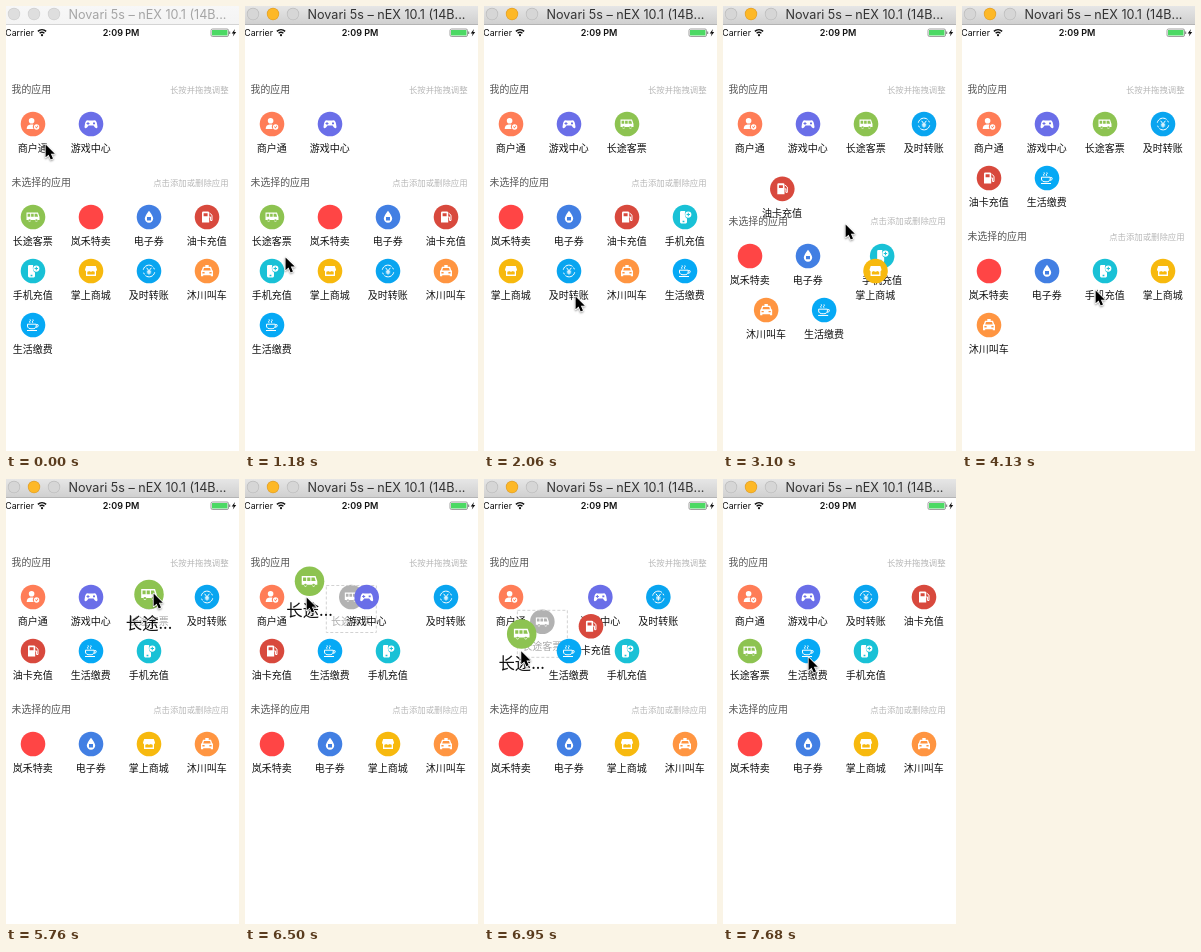
An HTML page with a canvas for the animation above (8 s loop, 233 px wide and 445 px high).

```html
<!DOCTYPE html>
<html lang="zh-CN">
<head>
<meta charset="utf-8">
<style>
html, body { margin: 0; width: 100%; height: 100%; overflow: hidden; background: #fff }
canvas { display: block; width: 233px; height: 445px }
</style>
</head>
<body>
<canvas id="stage"></canvas>
<script>
const canvas = document.getElementById('stage'), ctx = canvas.getContext('2d');
const W = 233, H = 445, LOOP = 8000, STEP = 147.7, SHIFT = 300;
const dpr = window.devicePixelRatio || 1;
canvas.width = W * dpr;
canvas.height = H * dpr;

const CJK = '"Noto Sans CJK SC", "Noto Sans CJK", sans-serif';
const LATIN = 'Inter, Roboto, sans-serif';

// label, colour, filled glyph, stroked glyph
const apps = {
  shop: ['商户通', '#ff7d57',
    'M-4.2-3.2a2.8 2.8 0 1 1 5.6 0a2.8 2.8 0 1 1-5.6 0M-6.3 5Q-6.3 .8-2.5 .4L.4 .4Q-1 3 .6 5ZM.9 3a2.7 2.7 0 1 1 5.4 0a2.7 2.7 0 1 1-5.4 0M2 2.7L3.5 4.5L5.3 2L4.6 1.6L3.5 3.2L2.6 2.2Z', ''],
  game: ['游戏中心', '#6a6ee8',
    'M-4-3.8Q0-3 4-3.8Q6-3 6.5 3Q6 5.2 4 3.4L2.5 1.6H-2.5L-4 3.4Q-6 5.2-6.5 3Q-6-3-4-3.8ZM-3.5-2V-1H-4.5V0H-3.5V1H-2.5V0H-1.5V-1H-2.5V-2ZM2-1.5V.3H4V-1.5Z', ''],
  bus: ['长途客票', '#8dc351',
    'M-6.5-4.4H5L6.5 0V3H4.8A1.5 1.5 0 0 1 2 3H-2A1.5 1.5 0 0 1-4.8 3H-6.5ZM-5.4-3.2V-.2H-2.8V-3.2ZM-1.9-3.2V-.2H.7V-3.2ZM1.6-3.2V-.2H5.1L4.2-3.2ZM-4.6 3.4a1.2 1.2 0 1 0 2.4 0a1.2 1.2 0 1 0-2.4 0M2.2 3.4a1.2 1.2 0 1 0 2.4 0a1.2 1.2 0 1 0-2.4 0', ''],
  sale: ['岚禾特卖', '#ff4545', '', ''],
  ticket: ['电子券', '#427fe3',
    'M0-6.3Q4.2-1 4.2 1.5A4.2 4.2 0 1 1-4.2 1.5Q-4.2-1 0-6.3ZM-2 0V3.4H2V0Z', ''],
  fuel: ['油卡充值', '#d8493d',
    'M-5 5.5V-4.2Q-5-5.5-3.7-5.5H.8Q2.2-5.5 2.2-4.2V5.5ZM-3.4-3.7V-.8H.6V-3.7Z',
    'M2.5-4L5-1.8V3.5H3.6V0H2.2'],
  phone: ['手机充值', '#19c1d6',
    'M-5-4.6Q-5-6-3.8-6H.2Q-1 0 2 1.5V5.1Q2 6.4 .8 6.4H-3.8Q-5 6.4-5 5.1ZM-2.4 3.8V5.2H-.6V3.8ZM.2-2.4a3.1 3.1 0 1 1 6.2 0a3.1 3.1 0 1 1-6.2 0M2.8-4.2V-2.9H1.6V-2H2.8V-.7H3.8V-2H5V-2.9H3.8V-4.2Z', ''],
  mall: ['掌上商城', '#f7b90e',
    'M-4.8-5H4.8L6-1.5Q5.8 .3 5 .3V5H-5V.3Q-5.8 .3-6-1.5ZM-3.7 .8V3.6H3.7V.8Q2.6 .6 1.9 0Q0 1.6-1.9 0Q-2.6 .6-3.7 .8Z', ''],
  pay: ['及时转账', '#09a5f0', '',
    'M-5.7-1.3A5.8 5.8 0 0 1 3.6-4.6M5.7 1.3A5.8 5.8 0 0 1-3.6 4.6M-5.4 1.7L-4.6 3.4M5.4-1.7L4.6-3.4M-2.4-3.2L0-.2L2.4-3.2M0-.2V3.6M-2.2 .2H2.2M-2.2 1.9H2.2'],
  taxi: ['沐川叫车', '#ff9541',
    'M-1.7-6H1.7V-4.3H4L5.2-.8L6-.2V5.3H3.8V4.2H-3.8V5.3H-6V-.2L-5.2-.8L-4-4.3H-1.7ZM-3-3L-3.8-.6H3.8L3-3ZM-4.6 1V2.4H-2.4V1ZM2.4 1V2.4H4.6V1Z', ''],
  cup: ['生活缴费', '#06a9f5', '',
    'M-5.5-.8H3.2V1Q3.2 3.8-1 3.8Q-5.5 3.8-5.5 1ZM3.2-.3H5Q6 2.2 2.8 2.2M-6 5.5H4M-3-2.2Q-4-3.2-3-4T-3-5.6M-.2-2.2Q-1.2-3.2-.2-4T-.2-5.6']
};
for (const app of Object.values(apps)) {
  app[2] = new Path2D(app[2]);
  app[3] = new Path2D(app[3]);
}

// start time, chosen apps, remaining apps
const states = [
  [-999, 'shop game', 'bus sale ticket fuel phone mall pay taxi cup'],
  [1420, 'shop game bus', 'sale ticket fuel phone mall pay taxi cup'],
  [2250, 'shop game bus pay', 'sale ticket fuel phone mall taxi cup'],
  [2906, 'shop game bus pay fuel', 'sale ticket phone mall taxi cup'],
  [3620, 'shop game bus pay fuel cup', 'sale ticket phone mall taxi'],
  [4465, 'shop game bus pay fuel cup phone', 'sale ticket mall taxi'],
  [6322, 'shop bus game pay fuel cup phone', 'sale ticket mall taxi'],
  [6800, 'shop game pay fuel bus cup phone', 'sale ticket mall taxi']
].map(([start, mine, rest]) => {
  const at = {};
  mine = mine.split(' ');
  const head = 176 + 54 * (Math.ceil(mine.length / 4) - 1);
  const place = top => (id, i) => { at[id] = [27 + 58 * (i % 4), top + 54 * Math.floor(i / 4)]; };
  mine.forEach(place(118));
  rest.split(' ').forEach(place(head + 35));
  return { start, at, head };
});

const track = [
  [0, 39, 137], [600, 58, 296], [750, 58, 311], [1180, 40, 250], [1400, 31, 227],
  [1550, 33, 229], [1850, 74, 274], [2068, 91, 289], [2300, 92, 286], [2750, 134, 226],
  [2906, 134, 222], [3102, 122, 217], [3500, 88, 316], [3650, 87, 320], [4135, 133, 283],
  [4480, 138, 278], [4720, 143, 255], [4870, 149, 170], [5020, 151, 88], [5320, 147, 113],
  [6060, 147, 113], [6210, 138, 113], [6499, 61, 117], [6800, 48, 158], [7000, 32, 176],
  [7240, 27, 186], [7390, 28, 190], [7535, 70, 184], [7680, 85, 177], [LOOP, 85, 177]
];
const LIFT = 5755, DASH = 5900, DRAG = 6190, DROP = 7450, FOCUS = 580;

const mix = (a, b, p) => a + (b - a) * p;

function cursorAt(t) {
  const i = Math.max(1, track.findIndex(k => k[0] >= t));
  const [a, b] = [track[i - 1], track[i]];
  const p = (t - a[0]) / (b[0] - a[0]);
  return [mix(a[1], b[1], p), mix(a[2], b[2], p)];
}

function text(str, x, y, size, color, align = 'left', family = CJK, weight = 400) {
  ctx.font = `${weight} ${size}px ${family}`;
  ctx.fillStyle = color;
  ctx.textAlign = align;
  ctx.fillText(str, x, y);
}

function disc(x, y, r, color) {
  ctx.beginPath();
  ctx.arc(x, y, r, 0, 7);
  ctx.fillStyle = color;
  ctx.fill();
}

function icon(id, x, y, scale, color) {
  const [, main, fill, line] = apps[id];
  ctx.save();
  ctx.translate(x, y);
  ctx.scale(scale, scale);
  disc(0, 0, 12.3, color || main);
  ctx.fillStyle = ctx.strokeStyle = '#fff';
  ctx.fill(fill, 'evenodd');
  ctx.stroke(line);
  ctx.restore();
}

function tile(id, x, y, ghost) {
  icon(id, x, y, 1, ghost && '#b2b2b2');
  text(apps[id][0], x - .2, y + 27.8, 10, ghost ? '#aaa' : '#111', 'center');
}

function titleBar(active) {
  const g = ctx.createLinearGradient(0, 0, 0, 18);
  g.addColorStop(0, active ? '#e6e6e6' : '#f7f7f7');
  g.addColorStop(1, active ? '#d0d0d0' : '#f4f4f4');
  ctx.fillStyle = g;
  ctx.fillRect(0, 0, W, 18);
  ctx.fillStyle = active ? '#b4b4b4' : '#d4d4d4';
  ctx.fillRect(0, 18, W, 1);
  [8, 28, 48].forEach((x, i) => {
    const lit = active && i === 1;
    disc(x, 8, 6.2, lit ? '#e0a02c' : active ? '#bcbcbc' : '#cfcfcf');
    disc(x, 8, 5.5, lit ? '#fdb827' : active ? '#d6d6d6' : '#dedede');
  });
  text('Novari 5s – nEX 10.1 (14B...', 62.5, 13, 12.6, active ? '#333' : '#a5a5a5', 'left', LATIN);
}

function statusBar() {
  text('Carrier', 28, 30, 8.8, '#111', 'right', LATIN);
  text('2:09 PM', 115, 30, 9, '#111', 'center', LATIN, 600);
  ctx.strokeStyle = '#111';
  ctx.lineWidth = 1.4;
  for (const r of [3.6, 6.2]) {
    ctx.beginPath();
    ctx.arc(36, 30, r, -2.3, -.84);
    ctx.stroke();
  }
  disc(36, 29.2, 1.1, '#111');
  ctx.lineWidth = .7;
  ctx.strokeStyle = '#777';
  ctx.beginPath();
  ctx.roundRect(205, 23, 17.5, 7.5, 1.5);
  ctx.stroke();
  ctx.fillStyle = '#4cd964';
  ctx.fillRect(206, 24, 15.5, 5.5);
  ctx.fillStyle = '#777';
  ctx.fillRect(223.2, 25.5, 1, 2.5);
  ctx.fillStyle = '#111';
  ctx.fill(new Path2D('M229 23L225.7 27.4H227.7L226.8 30.5L230.2 26.1H228.2Z'));
}

const arrow = new Path2D('M0 0V14.5L3.4 11.4L5.8 17L8.4 15.9L6 10.4H10.5Z');
function pointer(x, y) {
  ctx.save();
  ctx.translate(x + .6, y + 1.6);
  ctx.scale(.88, .88);
  ctx.shadowColor = '#0006';
  ctx.shadowBlur = 2 * dpr;
  ctx.shadowOffsetY = dpr;
  ctx.lineWidth = 1.8;
  ctx.lineJoin = 'round';
  ctx.strokeStyle = '#fff';
  ctx.stroke(arrow);
  ctx.shadowColor = 'transparent';
  ctx.fillStyle = '#000';
  ctx.fill(arrow);
  ctx.restore();
}

function draw(t) {
  ctx.setTransform(dpr, 0, 0, dpr, 0, 0);
  ctx.fillStyle = '#fff';
  ctx.fillRect(0, 0, W, H);
  titleBar(t >= FOCUS);
  statusBar();
  ctx.lineWidth = 1;

  const n = states.findLastIndex(s => s.start <= t);
  const now = states[n], was = states[Math.max(0, n - 1)];
  const k = Math.min(1, (t - now.start) / SHIFT), p = k * k * (3 - 2 * k);
  const head = mix(was.head, now.head, p);
  text('我的应用', 5.5, 87, 9.9, '#555');
  text('长按并拖拽调整', 222.5, 86.5, 8.4, '#b8b8b8', 'right');
  text('未选择的应用', 5.5, head + 4, 9.9, '#555');
  text('点击添加或删除应用', 222.5, head + 3.5, 8.4, '#b8b8b8', 'right');

  const lifted = t >= LIFT && t < DROP;
  const spot = id => [0, 1].map(i => mix(was.at[id][i], now.at[id][i], p));
  if (lifted) {
    const [x, y] = spot('bus');
    tile('bus', x, y, true);
    if (t >= DASH) {
      ctx.setLineDash([3, 2]);
      ctx.strokeStyle = '#d2d2d2';
      ctx.strokeRect(x - 25, y - 11.5, 50, 47);
      ctx.setLineDash([]);
    }
  }
  for (const id in apps) if (!lifted || id !== 'bus') tile(id, ...spot(id));

  const tip = cursorAt(t);
  if (lifted) {
    const [x, y] = t < DRAG ? [143, 130] : cursorAt(t - 13);
    icon('bus', x, y - 14.6, 1.2);
    text('长途...', x, y + 20, 16.4, '#111', 'center');
  }
  pointer(...tip);
}

// The screen refreshes in even steps
function tick(ms) {
  draw(Math.floor((ms % LOOP + 8) / STEP) * STEP % LOOP);
  requestAnimationFrame(tick);
}
requestAnimationFrame(tick);
</script>
</body>
</html>
```
